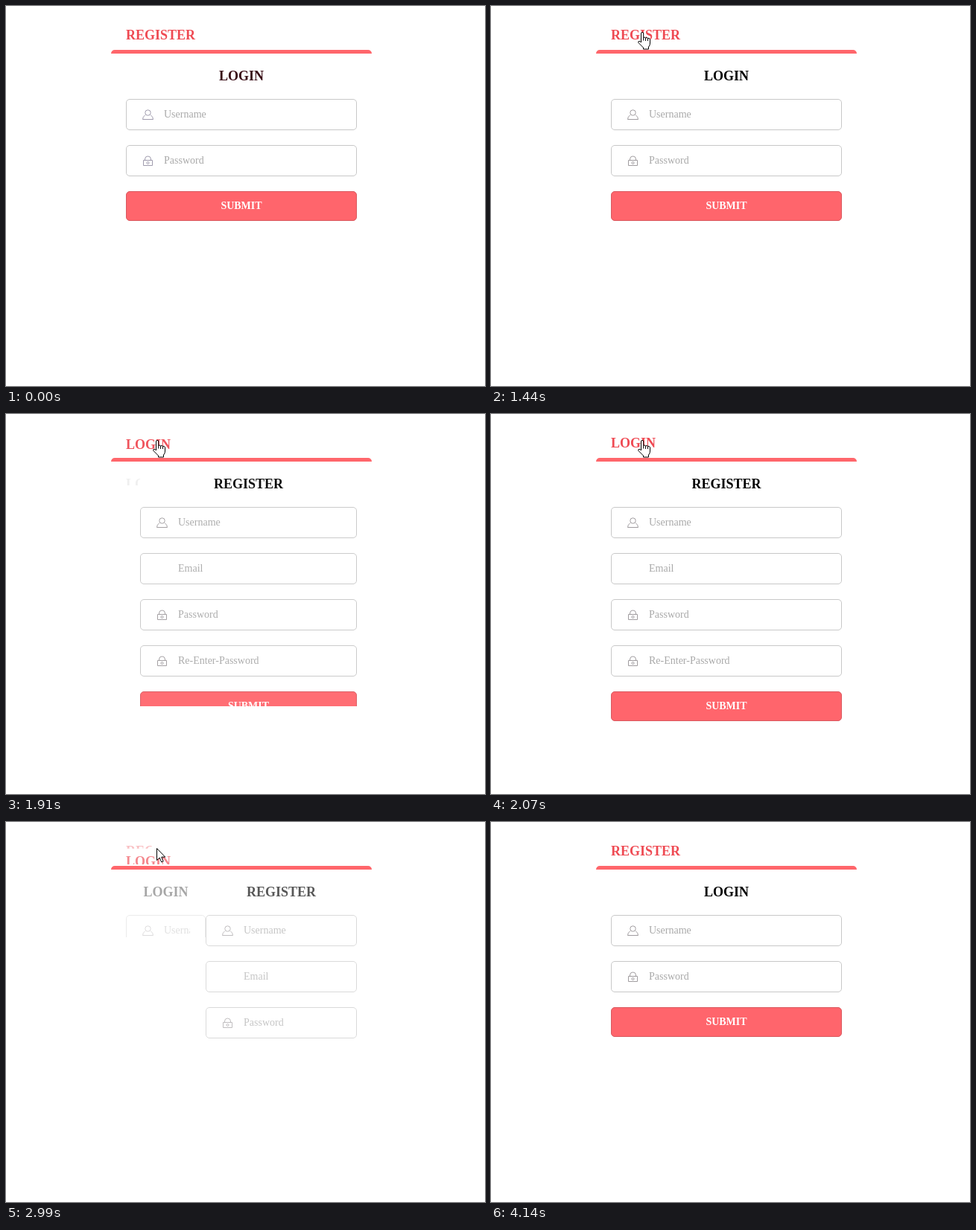
Recreate the animation shown at these times as an HTML page. Size 643 by 511 pixels, loop 4600 ms.

```html
<!DOCTYPE html>
<html lang="en">
<head>
<meta charset="utf-8">
<title>Login and register</title>
<style>
  html, body { margin: 0; width: 100%; height: 100%; overflow: hidden; background: #fff; }
  #stage { display: block; width: 643px; height: 511px; font-family: "Liberation Serif", "Times New Roman", serif; }
  .tab { font-size: 18px; font-weight: bold; fill: #ef4a53; }
  .title { font-size: 18px; font-weight: bold; fill: var(--title); }
  .hint { font-size: 14px; fill: #a9a9a9; }
  .field { fill: #fff; stroke: #c8c8c8; }
  .icon { fill: none; stroke: var(--icon); }
  .button { fill: #ff656c; stroke: #d9595f; }
  .submit { font-size: 14px; font-weight: bold; fill: #fff; text-anchor: middle; }
  .cursor { fill: #fff; stroke: #000; stroke-linejoin: round; }
</style>
</head>
<body>
<svg id="stage" viewBox="0 0 643 511"></svg>
<script>
const LOOP = 4600, LEFT = 161, WIDTH = 310, TOP = 84;
const TAB_TOP = 22, TAB_W = 100, TAB_H = 40, TAB_CLIP = 57;
const SWITCH = 572, TO_REGISTER = 1428, TO_LOGIN = 2761;

// The screen refreshes only at these moments.
const TICKS = [0, 440, 520, 590, 670, 750, 830, 900, 980, 1060,
  1440, 1530, 1610, 1680, 1760, 1840, 1910, 1990, 2070,
  2760, 2840, 2910, 2990, 3070, 3140, 3220, 3300, 3380,
  3840, 3920, 3990, 4070, 4140];

// Pointer path: time, x, y
const PATH = [
  [440, 487, 445], [520, 352, 302], [590, 236, 172], [670, 172, 95],
  [750, 156, 70], [830, 157, 61], [900, 165, 47], [980, 190, 39],
  [1060, 202, 35], [3830, 202, 35], [3840, 164, 68], [3920, 214, 176],
  [3990, 352, 328], [4070, 549, 493], [4139, 549, 493]
];

const ICONS = {
  user: "M25.8 21.6Q22.5 24 22.5 27.5H36.5Q36.5 24 33.2 21.6M29.5 14.8a3.7 3.7 0 0 1 0 7.4a3.7 3.7 0 0 1 0-7.4z",
  lock: "M23.5 20.5h12v7h-12zM25.5 20.5V19a4 4 0 0 1 8 0v1.5M29.5 22.5a1.5 1.5 0 0 1 0 3a1.5 1.5 0 0 1 0-3z"
};
const ARROW = "M.5.5V16.5L4.2 13L6.7 18.9L9.2 17.9L6.7 12.1H11.7Z";
const HAND = "M4.5 14V2a1.5 1.5 0 0 1 3.2 0V7.5q1.6-1 2.9.3q1.6-.8 2.9.5q2.5-.5 3 1.7V15q0 3-2 5v3H7.5v-2L1 14.5q-.8-2 1-2.3q1.2 0 2.5 1.8zM7.7 7.5v4M10.6 8v4M13.5 8.5v3.5";

const stage = document.getElementById("stage");

function set(node, attrs) {
  for (const key in attrs) node.setAttribute(key, attrs[key]);
  return node;
}

function add(parent, tag, attrs, text) {
  const node = document.createElementNS("http://www.w3.org/2000/svg", tag);
  if (text) node.textContent = text;
  return parent.appendChild(set(node, attrs));
}

function box(parent, attrs) {
  return add(parent, "svg", { overflow: "hidden", ...attrs });
}

function makeTab(parent, label) {
  const group = add(parent, "g", {});
  const view = box(group, { x: LEFT });
  add(view, "text", { class: "tab", x: 0, y: 45 - TAB_TOP }, label);
  return (part, y) => {
    set(group, { opacity: part, visibility: part > 0 ? "visible" : "hidden" });
    set(view, { y, width: TAB_W * part, height: TAB_H * part });
  };
}

function makePanel(title, titleW, rows) {
  const group = add(stage, "g", {});
  const view = box(group, { y: TOP });
  const head = add(view, "text", { class: "title", y: 16 }, title);
  const fields = rows.map(([hint, icon], i) => {
    const y = 41 + i * 62;
    const rect = add(view, "rect", { class: "field", x: 0.5, y: y + 0.5, height: 41, rx: 4.5 });
    if (icon) add(view, "path", { class: "icon", d: ICONS[icon], transform: `translate(0 ${y})` });
    const clip = box(view, { x: 51, y, height: 42 });
    add(clip, "text", { class: "hint", x: 0, y: 25 }, hint);
    return { rect, clip };
  });
  const top = 41 + rows.length * 62, full = top + 40;
  const button = add(view, "rect", { class: "button", x: 0.5, y: top + 0.5, height: 39, rx: 4.5 });
  const submit = add(view, "text", { class: "submit", y: top + 24 }, "SUBMIT");

  return (part, x, w) => {
    set(group, { opacity: part, visibility: part > 0 ? "visible" : "hidden" });
    set(view, { x, width: w, height: Math.round(full * part) });
    set(head, { x: Math.max(0, (w - titleW) / 2) });
    const fieldW = Math.max(w, 72);
    for (const { rect, clip } of fields) {
      set(rect, { width: fieldW - 1 });
      set(clip, { width: fieldW - 72 });
    }
    set(button, { width: Math.max(0, w - 1) });
    set(submit, { x: w / 2 });
  };
}

const header = box(stage, { x: 0, y: 0, width: 643, height: TAB_CLIP });
const registerTab = makeTab(header, "REGISTER");
const loginTab = makeTab(header, "LOGIN");
add(stage, "path", { d: "M141 64a5 5 0 0 1 5-5h340a5 5 0 0 1 5 5z", fill: "#ff666b" });
const loginPanel = makePanel("LOGIN", 60, [["Username", "user"], ["Password", "lock"]]);
const registerPanel = makePanel("REGISTER", 93,
  [["Username", "user"], ["Email"], ["Password", "lock"], ["Re-Enter-Password", "lock"]]);
const cursor = add(stage, "path", { class: "cursor" });

function swing(t, start) {
  const p = Math.min(1, Math.max(0, (t - start) / SWITCH));
  return 0.5 - Math.cos(p * Math.PI) / 2;
}

function pointerAt(t) {
  const i = PATH.findIndex(p => p[0] >= t);
  if (i < 0 || t < PATH[0][0]) return null;
  if (i === 0) return PATH[0].slice(1);
  const a = PATH[i - 1], b = PATH[i], k = (t - a[0]) / (b[0] - a[0]);
  return [a[1] + (b[1] - a[1]) * k, a[2] + (b[2] - a[2]) * k];
}

function overTab(x, y, part) {
  if (x < LEFT || y < TAB_TOP || y >= TAB_CLIP) return false;
  const upper = y < TAB_TOP + TAB_H * part;
  return x < LEFT + TAB_W * (upper ? part : 1 - part);
}

function draw(time) {
  const t = TICKS.findLast(tick => tick <= time);
  const reg = swing(t, TO_REGISTER) - swing(t, TO_LOGIN);
  const log = 1 - reg;
  const w = Math.round(WIDTH * log);

  stage.style.setProperty("--title", t < 1440 ? "#380b14" : "#000");
  stage.style.setProperty("--icon", t < 1440 ? "#9f9bad" : "#a09c9f");
  registerTab(log, TAB_TOP);
  loginTab(reg, TAB_TOP + TAB_H * log);
  loginPanel(log, LEFT, w);
  registerPanel(reg, LEFT + w, WIDTH - w);

  const at = pointerAt(t);
  set(cursor, { visibility: at ? "visible" : "hidden" });
  if (at) {
    const [x, y] = at.map(Math.round);
    const hand = overTab(x, y, log);
    set(cursor, { d: hand ? HAND : ARROW, transform: `translate(${hand ? x - 5 : x} ${y})` });
  }
}

const begin = performance.now();
function loop() {
  draw((performance.now() - begin) % LOOP);
  requestAnimationFrame(loop);
}
loop();
</script>
</body>
</html>
```
